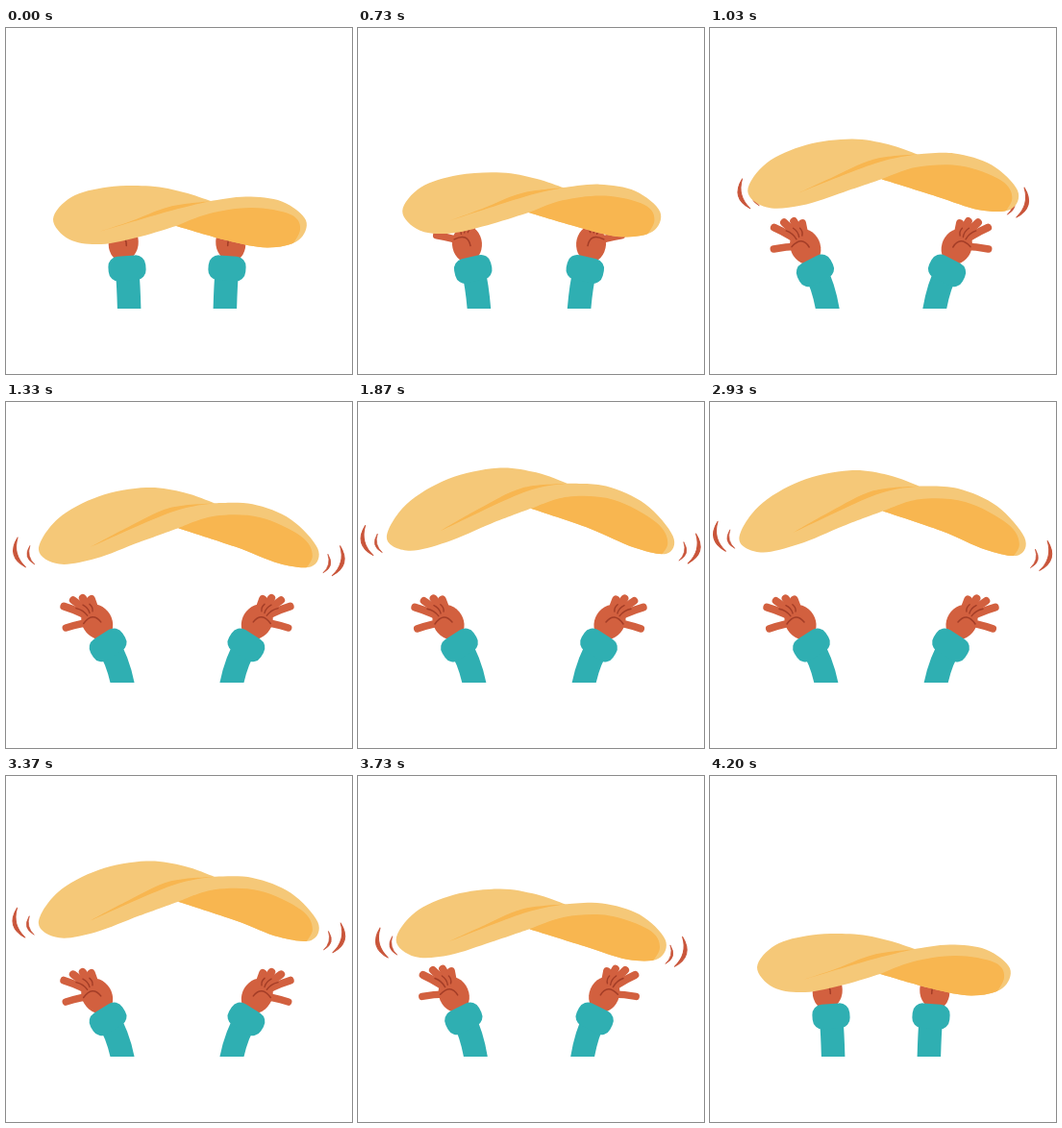
Animation of 360x360 px, one loop 5.17 s. Source, as an HTML page with a canvas:

```html
<!DOCTYPE html>
<html lang="en">
<head>
<meta charset="utf-8">
<title>Dough toss</title>
<style>
  html, body { margin: 0; width: 100%; height: 100%; overflow: hidden; background: #fff; }
  canvas { display: block; width: 360px; height: 360px; }
</style>
</head>
<body>
<canvas id="stage"></canvas>
<script>
const SIZE = 360, LOOP = 5170, START = 630, STEP = 100 / 3, FLOOR = 292;
const COLOR = {
  dough: '#f5c878', fold: '#f8b650', skin: '#d2603f',
  line: '#a33d27', sleeve: '#2fafb2', mark: '#c9553a'
};

// The dough at rest; bend() gives every other pose
const LEFT_LOBE = [[177, 206], [140, 217], [99, 225], [66, 220], [49, 199], [68, 176],
  [106, 165.5], [150, 164.5], [185, 171], [213, 180]];
const RIGHT_LOBE = [[213, 180], [250, 175.5], [287, 180.5], [312, 200], [304, 221],
  [272, 228.5], [230, 221], [177, 206]];
const UNDERSIDE = [[177, 206], [212, 193], [256, 187], [296, 194], [306, 210], [292, 234]];
const CREASE_TOP = [[95, 212.5], [130, 201], [170, 186], [213, 180]];
const CREASE_LOW = [[213, 180], [172, 190], [95, 212.5]];
const LEFT_TIP = [49, 197], RIGHT_TIP = [313, 207];

const canvas = document.getElementById('stage');
const ctx = canvas.getContext('2d');
const dpr = window.devicePixelRatio || 1;
canvas.width = canvas.height = SIZE * dpr;

const mix = (a, b, k) => a + (b - a) * k;
const rad = deg => deg * Math.PI / 180;
const clamp = u => Math.min(Math.max(u, 0), 1);

// Motion
const arc = u => 1 - (1 - clamp(u) ** 1.2) ** 3;
const lift = t => 1.02 * arc((t - 597) / 1600) * arc((4196 - t) / 1800);
const tuck = t => 45 * (1 - clamp(Math.min((t - 860) / 600, (4060 - t) / 660))) ** 3;
const drift = t => 6 * Math.sin(Math.PI * clamp((t - 1870) / 1860));

// Raise the dough by k, its middle leading and its tips spreading
const bend = k => ([x, y]) => {
  const dx = x - 183;
  return [
    x + k * (3 + .13 * dx + .1 * (y - 200) - .00025 * dx * dx),
    y + k * (-95.5 + .0021 * dx * dx + .07 * (y - 195))
  ];
};

// Smooth curve through points
function trace(path, pts, join = false) {
  const at = i => pts[Math.min(Math.max(i, 0), pts.length - 1)];
  path[join ? 'lineTo' : 'moveTo'](...pts[0]);
  for (let i = 0; i < pts.length - 1; i++) {
    const [a, b, c, d] = [at(i - 1), at(i), at(i + 1), at(i + 2)];
    path.bezierCurveTo(
      b[0] + (c[0] - a[0]) / 6, b[1] + (c[1] - a[1]) / 6,
      c[0] - (d[0] - b[0]) / 6, c[1] - (d[1] - b[1]) / 6, c[0], c[1]);
  }
  return path;
}

function fill(path, color) {
  ctx.fillStyle = color;
  ctx.fill(path);
}

function strokeCurve(from, control, to, color, width) {
  ctx.strokeStyle = color;
  ctx.lineWidth = width;
  ctx.beginPath();
  ctx.moveTo(...from);
  ctx.quadraticCurveTo(...control, ...to);
  ctx.stroke();
}

// Finger or line running out from the palm's centre
function ray(deg, from, to, color, width) {
  const at = (r, turn) => [r * Math.cos(rad(deg + turn)), r * Math.sin(rad(deg + turn))];
  strokeCurve(at(from, 0), at((from + to) / 2, 8), at(to, 0), color, width);
}

function drawHand(h) {
  ctx.save();
  ctx.translate(mix(120, 102, h), mix(239, 242, h));
  ctx.rotate(rad(40 * (1 - h)));
  ctx.translate(-8, -13);

  for (let i = 0; i < 4; i++) ray(204 + 17 * i, 0, 38 - 4.5 * i, COLOR.skin, 8);
  ray(168, 0, 33, COLOR.skin, 7.5);
  const palm = new Path2D();
  palm.ellipse(0, 0, 19, 15.5, rad(58), 0, 2 * Math.PI);
  fill(palm, COLOR.skin);

  for (let i = 0; i < 3; i++) ray(212 + 17 * i, 12, 26 - 3 * i, COLOR.line, 1.4);
  strokeCurve([-14, 2], [-5, -11], [4, 0], COLOR.line, 1.5);
  ctx.restore();
}

function drawArm(h) {
  drawHand(h);
  const x = mix(126, 105.5, h), y = mix(250, 253, h);
  ctx.save();
  ctx.beginPath();
  ctx.rect(0, 0, SIZE, FLOOR);
  ctx.clip();
  strokeCurve([x, y], [mix(128, 119, h), 273], [mix(128.5, 124, h), 310], COLOR.sleeve, 24.5);
  ctx.translate(x, y);
  ctx.rotate(rad(mix(-4, -33, h)));
  const cuff = new Path2D();
  cuff.roundRect(-19.5, -13, 39, 26, 10.5);
  fill(cuff, COLOR.sleeve);
  ctx.restore();
}

// Two crescents beside a tip, the inner one smaller
function drawMarks([x, y], side) {
  for (const [size, out, down] of [[1, 18, 5], [.62, 7, 8]]) {
    ctx.save();
    ctx.translate(x + side * out, y + down);
    ctx.scale(side * size, size);
    ctx.rotate(rad(15));
    const path = new Path2D();
    path.moveTo(0, -16);
    path.quadraticCurveTo(17, 0, 0, 16);
    path.quadraticCurveTo(10, 0, 0, -16);
    fill(path, COLOR.mark);
    ctx.strokeStyle = COLOR.mark;
    ctx.lineWidth = 1;
    ctx.stroke(path);
    ctx.restore();
  }
}

function drawDough(pose) {
  const outline = (a, b) =>
    trace(trace(new Path2D(), a.map(pose)), b.map(pose), true);
  const body = outline(LEFT_LOBE, RIGHT_LOBE);
  fill(body, COLOR.dough);

  ctx.save();
  ctx.clip(body);
  const under = trace(new Path2D(), UNDERSIDE.map(pose));
  under.lineTo(...pose([200, 270]));
  fill(under, COLOR.fold);
  ctx.restore();

  fill(outline(CREASE_TOP, CREASE_LOW), COLOR.fold);
}

function draw(time) {
  const t = START + Math.floor((time - START) / STEP + .05) * STEP;
  const k = lift(t), pose = bend(k);
  const h = 1 - Math.max(1 - k, 0) ** 2.3;

  ctx.setTransform(dpr, 0, 0, dpr, 0, 0);
  ctx.fillStyle = '#fff';
  ctx.fillRect(0, 0, SIZE, SIZE);
  ctx.lineCap = ctx.lineJoin = 'round';

  if (t > 860 && t < 4060) {
    const [lx, ly] = pose(LEFT_TIP), [rx, ry] = pose(RIGHT_TIP);
    drawMarks([lx + tuck(t), ly - drift(t)], -1);
    drawMarks([rx - tuck(t), ry + drift(t)], 1);
  }

  drawArm(h);
  ctx.save();
  ctx.translate(356, 0);
  ctx.scale(-1, 1);
  drawArm(h);
  ctx.restore();
  drawDough(pose);
}

const begin = performance.now();
function tick() {
  draw((performance.now() - begin) % LOOP);
  requestAnimationFrame(tick);
}
tick();
</script>
</body>
</html>
```
